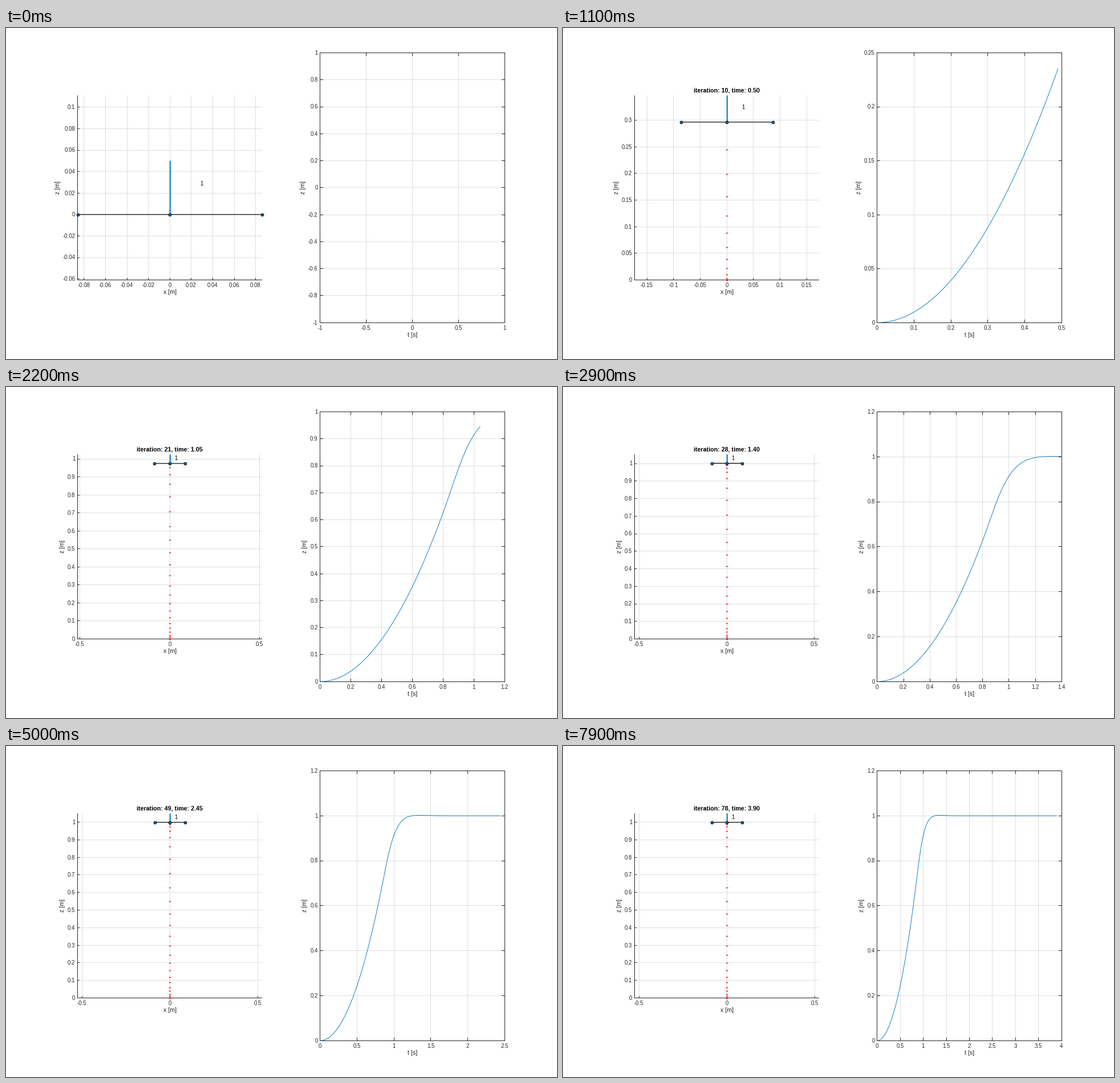
Write a matplotlib script that moves like this. It is 966 by 580 pixels and loops after 8 s.

```python
import math

import matplotlib.pyplot as plt
import numpy as np
from matplotlib.animation import FuncAnimation

W, H, DPI = 966, 580, 100
PT = 72 / DPI
FRAMES, INTERVAL = 80, 100
STEP = 0.05                       # simulated seconds per frame
ARM, MAST = 0.086, 0.05
BLUE, INK, GRID = "#0072BD", "#262626", "#dedede"
TICK_FONT, LABEL_FONT = 9.6, 10.6

# Panels in pixels: left, top, right, bottom
SCENE = (125.6, 118.2, 448.9, 441.5)
GRAPH = (550.9, 43.5, 874.2, 516.2)

# Climb at full thrust, then a damped approach to a height of 1 m
ACC, KP, KV = 1.96, 110, 18
A, B, C = KP * ACC / 2, KV * ACC, ACC - KP
T_OFF = (-B + math.sqrt(B * B - 4 * A * C)) / (2 * A)
ERR, VEL = 1 - ACC * T_OFF**2 / 2, ACC * T_OFF
SIGMA = KV / 2
OMEGA = math.sqrt(KP - SIGMA**2)

STEPS = [(m, m * 10.0**e) for e in range(-5, 1) for m in (1, 2, 5)]

plt.rcParams["font.family"] = "Liberation Sans"
fig = plt.figure(figsize=(W / DPI, H / DPI), dpi=DPI, facecolor="white")
ax = fig.add_axes([0, 0, 1, 1])


def height(t):
    t = np.asarray(t, float)
    s = np.maximum(t - T_OFF, 0)
    swing = ERR * np.cos(OMEGA * s) + (SIGMA * ERR - VEL) / OMEGA * np.sin(OMEGA * s)
    return np.where(t < T_OFF, ACC * t**2 / 2, 1 - np.exp(-SIGMA * s) * swing)


def upper_limit(value):
    for _, step in STEPS:
        n = math.ceil(value / step - 1e-6)
        if n <= 10:
            return n * step


def ticks(lo, hi, most):
    def multiples(step):
        first, last = math.ceil(lo / step - 1e-6), math.floor(hi / step + 1e-6)
        return [n * step for n in range(first, last + 1)]

    for i, (m, step) in enumerate(STEPS):
        values = multiples(step)
        if len(values) <= 11:
            if len(values) > most:
                values = multiples(STEPS[i + (2 if m == 1 else 1)][1])
            return values


def text(x, y, s, size=TICK_FONT, ha="center", va="baseline", color=INK, **kw):
    ax.text(x, y, s, fontsize=size * PT, ha=ha, va=va, color=color, **kw)


def line(xs, ys, color, width, **kw):
    ax.plot(xs, ys, color=color, lw=width * PT, snap=False, zorder=5, **kw)


def rule(xs, ys, color=INK, z=2):
    """One-pixel line that fills whole pixels."""
    ax.plot(np.floor(xs) + 0.5, np.ceil(ys) - 0.5, color=color, lw=PT,
            snap=False, zorder=z)


def label(v):
    return f"{round(v, 8) + 0:g}"


def text_width(s):
    em = {"-": 0.333, ".": 0.278}
    return TICK_FONT * sum(em.get(c, 0.556) for c in s)


def panel(box, xlim, ylim, xname, boxed):
    """Draw grid, axes and labels; return the data-to-pixel mappings."""
    left, top, right, bottom = box

    def px(x):
        return left + (np.asarray(x) - xlim[0]) * (right - left) / (xlim[1] - xlim[0])

    def py(y):
        return bottom - (np.asarray(y) - ylim[0]) * (bottom - top) / (ylim[1] - ylim[0])

    size = 0.01 * max(right - left, bottom - top)
    power = 1000 if ylim[1] < 0.01 else 1
    widest = 0
    for v in ticks(*xlim, 10):
        x = px(v)
        rule([x, x], [top, bottom], GRID, 1)
        rule([x, x], [bottom, bottom - size])
        if boxed:
            rule([x, x], [top, top + size])
        text(x - 0.4, bottom + 12.5, label(v))
    for v in ticks(*ylim, 11):
        y, s = py(v), label(v * power)
        rule([left, right], [y, y], GRID, 1)
        rule([left, left + size], [y, y])
        if boxed:
            rule([right, right - size], [y, y])
        text(left - 4.4, y + 3.4, s, ha="right")
        widest = max(widest, text_width(s))
    if power > 1:
        text(left, top - 4, "×10", ha="left")
        text(left + 17, top - 8, "-3", 7.5, ha="left")

    rule([left, left, right], [top, bottom, bottom])
    if boxed:
        rule([left, right, right], [top, top, bottom])
    text((left + right) / 2, bottom + 24.5, xname, LABEL_FONT)
    text(left - 13.2 - widest, (top + bottom) / 2, "z [m]", LABEL_FONT,
         va="center", rotation=90)
    return px, py


def draw_scene(k):
    z = float(height(k * STEP))
    top = z + MAST
    half = max(ARM, top / 2)
    px, py = panel(SCENE, (-half, half), (top / 2 - half, top / 2 + half), "x [m]", False)
    trail = height(np.arange(k) * STEP)
    ax.plot(px(0 * trail), py(trail), "o", color="red", ms=2.4 * PT, mew=0, zorder=4)

    arm = np.array([-ARM, 0, ARM])
    line(px(arm[[0, 2]]), py([z, z]), "black", 1.2)
    line(px([0, 0]) + 0.5, py([z, top]), BLUE, 2, solid_capstyle="butt")
    ax.plot(px(arm), py([z] * 3), "o", ms=4.6 * PT, mfc=BLUE, mec="black",
            mew=PT, zorder=6)
    text(px(ARM / 3) - 0.5, py(z + ARM / 3) + 3.4, "1", ha="left", color="black", zorder=7)
    if k:
        text(287.25, 112, f"iteration: {max(1, k - 1)}, time: {(k - 1) * STEP:.2f}",
             LABEL_FONT, color="black", weight="bold")


def draw_graph(k):
    if k < 2:
        panel(GRAPH, (-1, 1), (-1, 1), "t [s]", True)
        return
    t = np.arange(5 * (k - 1)) * 0.01
    z = height(t)
    px, py = panel(GRAPH, (0, upper_limit(t[-1])), (0, upper_limit(z.max())), "t [s]", True)
    line(px(t), py(z), BLUE, 0.9)


def draw(k):
    ax.clear()
    ax.set(xlim=(0, W), ylim=(H, 0))
    ax.axis("off")
    draw_scene(k)
    draw_graph(k)
    return []


anim = FuncAnimation(fig, draw, frames=FRAMES, interval=INTERVAL,
                     init_func=lambda: [], repeat=True, repeat_delay=0)
plt.show()
```
